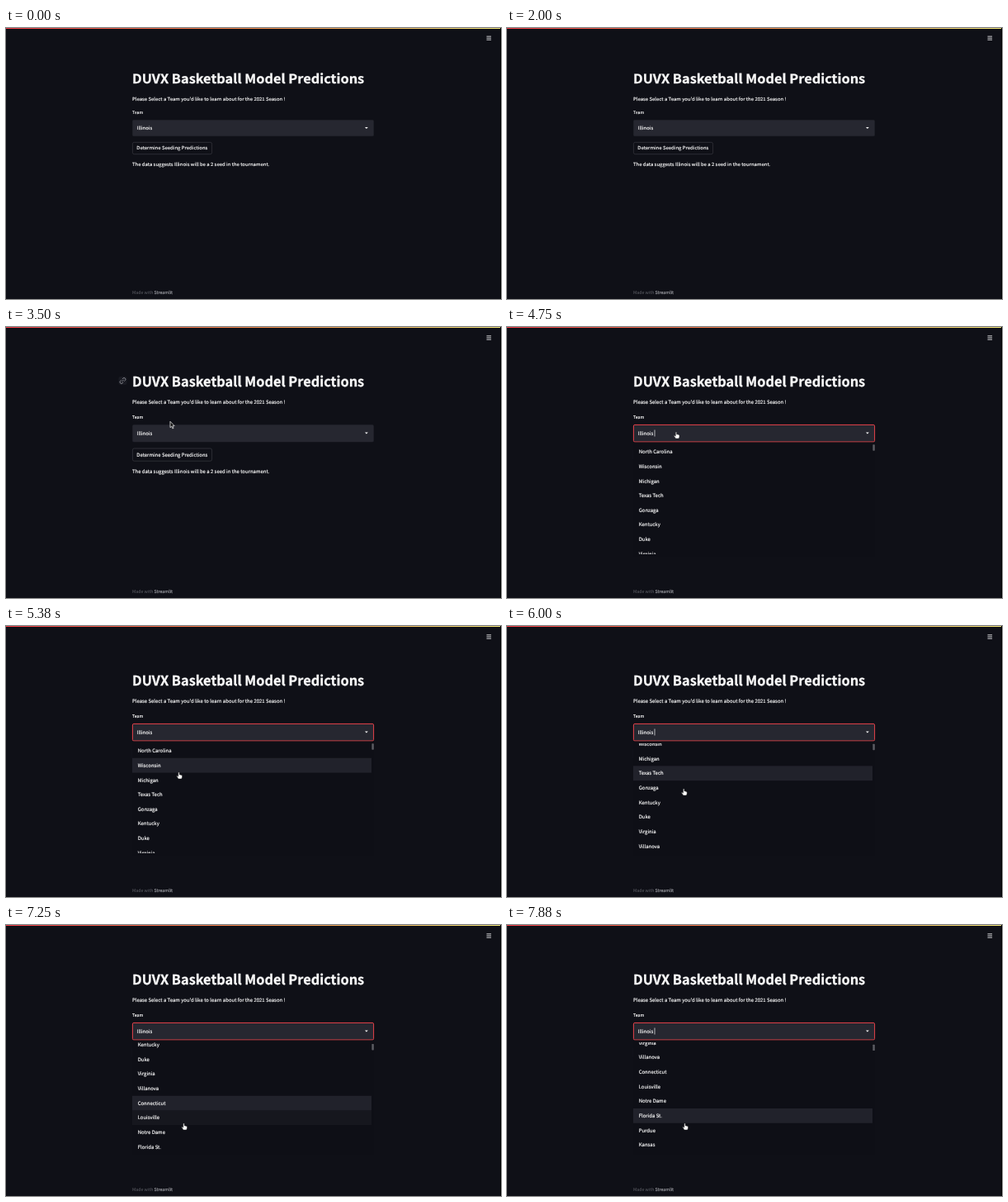
These frames come from a looping animation (600x328 px, 8 s). An HTML page:

```html
<!DOCTYPE html>
<html lang="en">
<head>
<meta charset="utf-8">
<title>Model Predictions</title>
<style>
  html, body { margin: 0; width: 100%; height: 100%; overflow: hidden; background: #0f1017; }
  svg { display: block; width: 600px; height: 328px; }
  text {
    font: 5.97px "Noto Sans CJK JP", "Noto Sans CJK SC", "Noto Sans CJK", "Noto Sans", sans-serif;
    fill: #fafafa;
    stroke: #fafafa;
    stroke-width: .16px;
    text-rendering: geometricPrecision;
    white-space: pre;
  }
  .title { font-size: 16.35px; font-weight: 700; stroke-width: .3px; }
  .label { font-size: 5.2px; }
  .foot { font-size: 5.25px; fill: #62646b; stroke: none; }
  .foot tspan { fill: #9a9ba1; stroke: #9a9ba1; }
</style>
</head>
<body>
<svg viewBox="0 0 600 328">
  <defs>
    <linearGradient id="deco">
      <stop offset="0" stop-color="#f4404a"/>
      <stop offset=".5" stop-color="#f58a4a"/>
      <stop offset="1" stop-color="#f5e878"/>
    </linearGradient>
    <clipPath id="listClip"><rect x="153" y="142" width="293" height="133"/></clipPath>
  </defs>
  <rect width="600" height="328" fill="#0f1017"/>

  <g id="page">
    <path d="M582.5 10.8h5.6M582.5 13h5.6M582.5 15.2h5.6" stroke="#e4e4e6" stroke-width=".9"/>
    <g id="anchor" fill="none" stroke="#8b8c93" stroke-width=".9">
      <rect x="136.5" y="60" width="10" height="10" rx="2" fill="#191a22" stroke="none"/>
      <g transform="rotate(-45 141.5 65)">
        <path d="M140.6 63.2h-1.4a1.8 1.8 0 0 0 0 3.6h1.4M142.4 63.2h1.4a1.8 1.8 0 0 1 0 3.6h-1.4M139.9 65h3.2"/>
      </g>
    </g>
    <text class="title" x="153" y="71.7">DUVX Basketball Model Predictions</text>
    <text x="153" y="93.2">Please Select a Team you'd like to learn about for the 2021 Season !</text>
    <text class="label" x="153" y="111">Team</text>
    <rect id="select" x="153.4" y="118.4" width="292.2" height="20.6" rx="1.5" fill="#262730"/>
    <text x="158.8" y="130.5">Illinois</text>
    <path id="caret" d="M179 124.5v8" stroke="#fafafa" stroke-width=".7"/>
    <path d="M435 127.4h3.8l-1.9 2.1z" fill="#fafafa"/>
    <rect id="button" x="153.4" y="147" width="96.2" height="15.2" rx="2" fill="#0f1017" stroke-width=".7"/>
    <text id="buttonText" x="158.3" y="156.5">Determine Seeding Predictions</text>
    <text x="153" y="177.2">The data suggests Illinois will be a 2 seed in the tournament.</text>
  </g>

  <text class="foot" x="153" y="322">Made with <tspan>Streamlit</tspan></text>
  <rect width="600" height="1" fill="url(#deco)"/>
  <rect x="599" width="1" height="328" fill="#000"/>

  <g id="menu">
    <rect x="153" y="139.6" width="293" height="138" fill="#0e0f16"/>
    <g clip-path="url(#listClip)">
      <g id="list">
        <rect id="fade" x="153" width="290" height="17.65" fill="#16171e"/>
        <rect id="mark" x="153" width="290" height="17.65" fill="#21222b"/>
      </g>
    </g>
    <rect id="thumb" x="443.4" width="2.4" height="7.4" rx=".6" fill="#5d5e64"/>
  </g>

  <path id="arrow" d="M0 0V7.4L1.7 5.9 2.9 8.6 4.1 8.1 2.9 5.4H5.2z" fill="#111" stroke="#fff" stroke-width=".7"/>
  <path id="hand" d="M-.7 .4Q0-.5 .7 .4V3Q1.4 2.5 1.9 3.2 2.6 2.8 3 3.5 3.9 3.2 4 4.2V6Q3.8 7 3.2 8H-.6Q-1.3 6.4-2.6 5 -2.5 3.9-1.5 4.5L-.7 5.2z" fill="#fff" stroke="#222" stroke-width=".5"/>
</svg>
<script>
const $ = id => document.getElementById(id);
const LOOP = 8000, STEP = 125, ROW = 17.65, TOP = 142.2;
const ZOOM_AT = 3000, ENTER = 3375, ON_BUTTON = 3625, OPEN = 4750;

const teams = ["North Carolina", "Wisconsin", "Michigan", "Texas Tech", "Gonzaga",
  "Kentucky", "Duke", "Virginia", "Villanova", "Connecticut", "Louisville",
  "Notre Dame", "Florida St.", "Purdue", "Kansas", "Syracuse"];

teams.forEach((name, i) => {
  const item = document.createElementNS("http://www.w3.org/2000/svg", "text");
  item.setAttribute("x", 159.7);
  item.setAttribute("y", TOP + ROW * (i + .5) + 2.2);
  item.textContent = name;
  $("list").append(item);
});

// Keys are [time, value...]; values run linearly between them.
const pointerKeys = [[3375, 206, 74], [3500, 199, 114.3], [3750, 199, 150], [4000, 203, 151],
  [4125, 205, 127], [4750, 205, 127], [5125, 208, 165], [5375, 209.5, 177],
  [5625, 211, 183], [5875, 213.5, 191], [6000, 214.2, 197], [6375, 215, 232],
  [6500, 215, 232], [6625, 215.5, 239], [6750, 215.5, 240], [8000, 215.5, 240]];
const scrollKeys = [[5375, 0], [5875, 21], [6000, 25.7], [6375, 40], [6500, 40],
  [6750, 51.5], [7375, 105], [7500, 105], [7875, 132]];

function at(keys, t) {
  const i = keys.findIndex(k => k[0] > t);
  if (i < 0) return keys[keys.length - 1].slice(1);
  if (i === 0) return keys[0].slice(1);
  const [a, b] = [keys[i - 1], keys[i]];
  const p = (t - a[0]) / (b[0] - a[0]);
  return a.slice(1).map((v, j) => v + (b[j + 1] - v) * p);
}

const mix = (a, b, p) => `rgb(${a.map((v, i) => Math.round(v + (b[i] - v) * p))})`;
const show = (id, on) => $(id).style.display = on ? "" : "none";
const move = (id, x, y) => $(id).setAttribute("transform", `translate(${x} ${y})`);

function rowUnder(t) {
  return Math.floor((at(pointerKeys, t)[1] - TOP + at(scrollKeys, t)[0]) / ROW);
}

function placeRow(id, row) {
  show(id, row >= 0);
  $(id).setAttribute("y", TOP + ROW * row);
}

function draw(t) {
  const zoomed = t >= ZOOM_AT, open = t >= OPEN;
  $("page").setAttribute("transform", zoomed ? "" : "scale(1 .9412)");

  const [x, y] = at(pointerKeys, t);
  const overTitle = t >= ENTER && t < ON_BUTTON;
  show("arrow", overTitle);
  show("anchor", overTitle);
  show("hand", t >= ON_BUTTON);
  move("arrow", x, y);
  move("hand", x, y);

  const hover = Math.max(0, Math.min(1, (t - ON_BUTTON) / 200, (4375 - t) / 250));
  const ink = mix([250, 250, 250], [255, 75, 75], hover);
  $("button").setAttribute("stroke", mix([58, 59, 66], [255, 75, 75], hover));
  $("buttonText").style.fill = $("buttonText").style.stroke = ink;

  $("select").setAttribute("stroke", open ? "#e8434a" : "#262730");
  $("select").setAttribute("stroke-width", open ? 1 : .4);
  show("caret", open && (t - 4630) % 1000 < 500);

  show("menu", open);
  if (!open) return;
  const scroll = at(scrollKeys, t)[0];
  move("list", 0, -scroll);
  placeRow("fade", rowUnder(t - STEP));
  placeRow("mark", rowUnder(t - 2 * STEP));
  $("thumb").setAttribute("y", 142.3 + scroll * .018);
}

const start = performance.now();
function tick() {
  const t = (performance.now() - start) % LOOP;
  draw(Math.floor(t / STEP) * STEP);
  requestAnimationFrame(tick);
}
tick();
</script>
</body>
</html>
```
